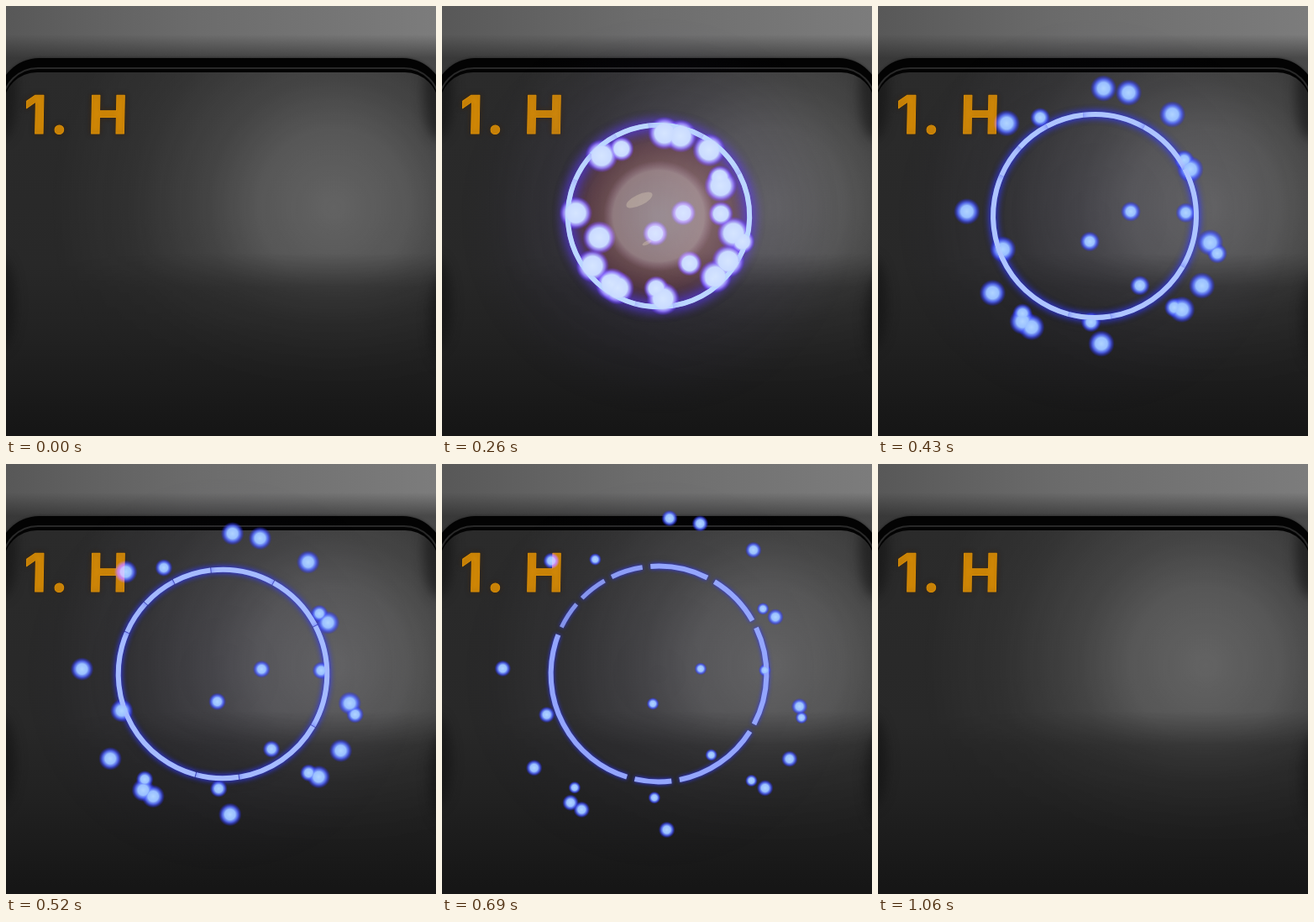
Animation of 512 by 512 pixels, one loop 1320 ms. Source, as an HTML page with a canvas:

```html
<!DOCTYPE html>
<html>
<head>
<meta charset="utf-8">
<style>
html, body { margin: 0; width: 100%; height: 100%; overflow: hidden; background: #555; }
#stage { position: relative; width: 512px; height: 512px; overflow: hidden;
  background: linear-gradient(transparent 34px, rgba(30,30,30,.55) 62px), linear-gradient(90deg, #585858, #6c6c6c 45%, #7c7c7c); }
#stage * { position: absolute; box-sizing: border-box; }
.rim { left: -10px; top: 62px; width: 532px; height: 500px; border-radius: 50px; background: #030303; box-shadow: 0 0 3px #222; }
.edge { left: -5px; top: 73px; width: 522px; height: 500px; border-radius: 43px; border: 2px solid #292929; }
.panel { left: -3px; top: 79px; width: 518px; height: 500px; border-radius: 40px; overflow: hidden;
  background: linear-gradient(#2b2b2b, #282828 230px, #222 310px, #161616 425px); }
.glow { left: 3px; top: 0; width: 512px; height: 433px;
  --fade: linear-gradient(#000 215px, rgba(0,0,0,.38) 256px, rgba(0,0,0,.2) 310px, transparent 410px);
  background: radial-gradient(circle at 390px 161px, rgba(255,255,255,.275), rgba(255,255,255,.215) 90px, rgba(255,255,255,.125) 150px, rgba(255,255,255,.04) 240px, transparent 340px);
  -webkit-mask-image: var(--fade); mask-image: var(--fade); }
.shade { width: 36px; height: 110px; border-radius: 50%; background: rgba(15,15,15,.55); filter: blur(7px); }
</style>
</head>
<body>
<div id="stage">
  <div class="rim"></div>
  <div class="edge"></div>
  <div class="panel">
    <div class="glow"></div>
    <div class="shade" style="left:-20px;top:-30px"></div>
    <div class="shade" style="left:500px;top:-30px"></div>
    <div class="shade" style="left:-22px;top:220px"></div>
    <div class="shade" style="left:507px;top:240px"></div>
  </div>
  <canvas id="view" width="512" height="512"></canvas>
</div>
<script>
const ctx = document.getElementById('view').getContext('2d');
const CX = 258, CY = 250, LOOP = 1320, START = 170, END = 1060, STEPS = 21, FLASH = 4;
const RAD = Math.PI / 180;

// Directions in degrees, with the final distance where it is not the usual one
const heavy = {
  size: .95, drag: .18, far: 203,
  paths: [[-86], [-74.6], [-52.6], [-26, 169], [13, 188], [33], [47], [87], [119.6], [124.4], [143], [160, 155], [182], [226.5]]
};
const light = {
  size: .72, drag: .22, far: 177,
  paths: [[-32, 154], [-7, 53], [-2, 133], [17, 187], [49], [57, 121], [92, 155], [101, 38], [126.5], [241, 164]]
};
const gaps = [-96.5, -61, -27.5, 30, 81, 105, 203.5, 222.5, 242];

const lerp = (a, b, t) => a + (b - a) * t;
const mix = (from, to, t, alpha = 1) => `rgba(${from.map((v, i) => lerp(v, to[i], t)).join()},${alpha})`;

function disc(x, y, r, stops) {
  const g = ctx.createRadialGradient(x, y, 0, x, y, r);
  for (const [at, color] of stops) g.addColorStop(at, color);
  ctx.fillStyle = g;
  ctx.beginPath();
  ctx.arc(x, y, r, 0, 7);
  ctx.fill();
}

function label() {
  ctx.save();
  ctx.transform(1, 0, -.02, 1, 21, 152);
  ctx.font = '700 63px Inter, "Liberation Sans", sans-serif';
  ctx.letterSpacing = '4.5px';
  ctx.lineJoin = 'round';
  ctx.fillStyle = ctx.strokeStyle = '#d98d06';
  ctx.shadowColor = 'rgba(60,35,10,.7)';
  ctx.shadowBlur = 6;
  ctx.fillText('1. H', 0, 0);
  ctx.strokeText('1. H', 0, 0);
  ctx.restore();
}

function flash(r) {
  disc(CX, CY, 210, [[0, 'rgba(100,60,170,.4)'], [.45, 'rgba(90,55,150,.4)'], [.55, 'rgba(75,60,110,.2)'], [1, 'rgba(70,60,100,0)']]);
  disc(CX, CY, r, [[0, '#ffd0b0'], [.55, '#f0906c'], [.75, '#bd584e'], [.9, '#854052'], [1, '#583468']]);
}

function embers() {
  ctx.fillStyle = '#fff1cd';
  for (const [x, y, size] of [[235, 231, 17], [244, 282, 6]]) {
    ctx.beginPath();
    ctx.ellipse(x, y, size, size * .38, -.45, 0, 7);
    ctx.fill();
  }
}

// The ring breaks at the gaps, which widen until its pieces are gone
function ring(k, r, heat) {
  const half = .06 * Math.max(0, k - 6) ** 2, fade = 1 - (k / STEPS) ** 6;
  const arc = (from, to, width, alpha) => {
    ctx.lineWidth = width;
    ctx.globalAlpha = alpha;
    ctx.beginPath();
    ctx.arc(CX, CY, r, from * RAD, to * RAD);
    ctx.stroke();
  };
  ctx.save();
  ctx.strokeStyle = mix([195, 224, 255], [120, 130, 255], k / STEPS);
  ctx.shadowColor = mix([48, 56, 255], [138, 60, 255], heat);
  ctx.shadowBlur = lerp(12, 1, k / STEPS) + 6 * heat;
  if (k < 12) arc(0, 360, 5.5, 1 - k / 12);
  gaps.forEach((gap, i) => {
    const from = gap + half, to = (gaps[i + 1] ?? gaps[0] + 360) - half;
    const strength = Math.min(1, .35 + (to - from) / 30);
    if (to > from) arc(from, to, 6 * strength, fade * strength);
  });
  ctx.restore();
}

function burst({ size, drag, far, paths }, k, heat) {
  const reach = 1 - Math.exp(-drag * (k + 1.7)), r = (23 - 1.05 * k) * size;
  const white = [250, 246, 255];
  const stops = [
    [0, mix([176, 212, 255], white, heat)],
    [lerp(.45, .7, heat), mix([154, 192, 255], white, heat)],
    [lerp(.68, .84, heat), mix([84, 106, 255], [215, 150, 255], heat, .85)],
    [1, mix([25, 25, 255], [150, 50, 255], heat, 0)]
  ];
  for (const [deg, end = far] of paths)
    disc(CX + end * reach * Math.cos(deg * RAD), CY + end * reach * Math.sin(deg * RAD), r, stops);
}

function explosion(k) {
  const heat = Math.max(0, 1 - k / FLASH), r = 134 - 43 * Math.exp(-.3 * k ** .77);
  const hot = paint => {
    ctx.globalAlpha = heat ** 2;
    paint();
    ctx.globalAlpha = 1;
  };
  disc(CX, CY, 240, [[0, `rgba(80,70,150,${.1 * (1 - k / STEPS)})`], [1, 'rgba(80,70,150,0)']]);
  hot(() => flash(r));
  ring(k, r, heat);
  ctx.globalCompositeOperation = 'lighten';
  hot(() => disc(CX, CY, 66, [[0, '#faf5ff'], [.82, '#faf5ff'], [1, 'rgba(225,170,255,0)']]));
  burst(heavy, k, heat);
  burst(light, k, heat);
  ctx.globalCompositeOperation = 'source-over';
  hot(embers);
}

function draw(now) {
  const k = Math.floor((now % LOOP - START) / (END - START) * STEPS);
  ctx.clearRect(0, 0, 512, 512);
  label();
  if (k >= 0 && k < STEPS) explosion(k);
  requestAnimationFrame(draw);
}
requestAnimationFrame(draw);
</script>
</body>
</html>
```
